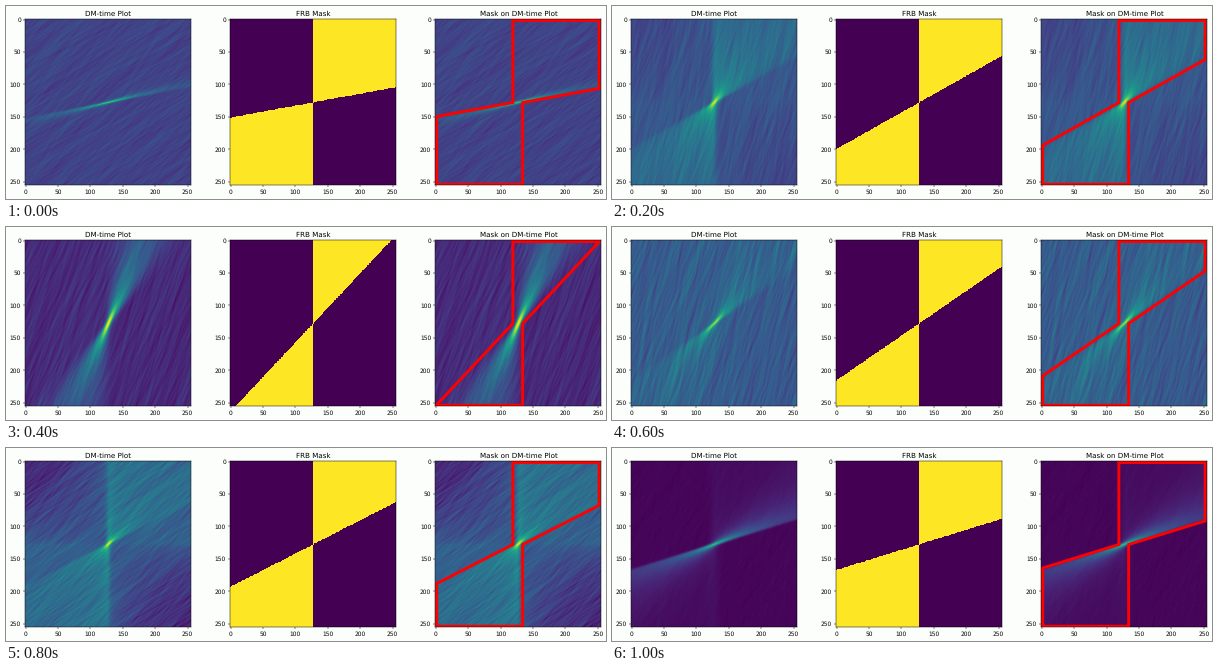
A matplotlib script that plays this animation: 600 px wide and 193 px high, repeating every 1200 ms.

```python
import numpy as np
import matplotlib.pyplot as plt
from matplotlib.animation import FuncAnimation

W, H, DPI = 600, 193, 100
SCALE = 0.426         # shrinks the default point sizes to the small stage
SIZE = 256
MID = SIZE // 2
PAPER = "#fcfefc"

plt.rcParams.update({
    "font.family": "DejaVu Sans",
    "text.hinting": "none",
    "axes.titlesize": 12 * SCALE,
    "axes.titlepad": 6 * SCALE,
    "axes.linewidth": 0.8 * SCALE,
    "xtick.labelsize": 10 * SCALE,
    "ytick.labelsize": 10 * SCALE,
})
for axis in ("xtick", "ytick"):
    plt.rcParams.update({
        f"{axis}.major.size": 3.5 * SCALE,
        f"{axis}.major.pad": 3.5 * SCALE,
        f"{axis}.major.width": 0.8 * SCALE,
    })

# rise: height of the mask edge over half the plot
# mu, sigma: which delays carry the pulse; edge: share at zero delay
# drift: range of noise delays; dark: dimming of the two empty corners
BURSTS = [
    dict(rise=23.5, mu=4.2, sigma=1.0, edge=0.05, width=6.0, gamma=1.4, gain=0.52,
         base=0.2, drift=(0.6, 2.2), noise=0.024, dark=0.0),
    dict(rise=72, mu=0.6, sigma=0.7, edge=0.35, width=2.6, gamma=0.68, gain=0.70,
         base=0.27, drift=(0.05, 0.5), noise=0.024, dark=0.06),
    dict(rise=136.5, mu=0.43, sigma=0.17, edge=0.0, width=2.6, gamma=0.75, gain=0.88,
         base=0.12, drift=(0.2, 0.6), noise=0.025, dark=0.0),
    dict(rise=88, mu=0.9, sigma=0.4, edge=0.0, width=2.6, gamma=1.0, gain=0.62,
         base=0.29, drift=(0.1, 0.5), noise=0.036, dark=0.0),
    dict(rise=65.5, mu=0.8, sigma=1.0, edge=0.6, width=2.6, gamma=0.75, gain=0.62,
         base=0.31, drift=(0.6, 1.9), noise=0.035, dark=0.22),
    dict(rise=39.5, mu=2.6, sigma=1.0, edge=0.05, width=4.0, gamma=0.7, gain=0.68,
         base=0.015, drift=(0.0, 1.0), noise=0.004, dark=0.0),
]

yy, xx = np.mgrid[:SIZE, :SIZE].astype(float)
dx, dy = xx - MID, yy - MID


def pulse_fan(b):
    """Sum the pulse over channels, each sheared by its own delay."""
    delays = np.linspace(0, MID / b["rise"], 120)
    weights = np.exp(-0.5 * ((delays - b["mu"]) / b["sigma"]) ** 2)
    weights /= weights.sum()
    zero_delay = np.exp(-delays / 0.1)
    weights += b["edge"] * 0.25 * zero_delay / zero_delay.sum()
    weights /= weights.sum()
    fan = np.zeros((SIZE, SIZE))
    for delay, weight in zip(delays, weights):
        spread = np.hypot(b["width"], 0.012 * dy * (1 + delay))
        shape = np.exp(-0.5 * ((dx + delay * dy) / spread) ** 2)
        fan += weight * shape * b["width"] / spread
    return fan ** b["gamma"]


def streaks(b, rng, channels=36):
    """Sheared one-dimensional noise, scaled to unit deviation."""
    total = np.zeros((SIZE, SIZE))
    for delay in np.linspace(*b["drift"], channels):
        strip = rng.normal(size=1024)
        strip = np.convolve(strip, [0.25, 0.5, 0.25], "same")
        total += np.interp(dx + delay * dy + 512, np.arange(1024), strip)
    return (total - total.mean()) / total.std()


def dm_time(index):
    b = BURSTS[index]
    rng = np.random.default_rng(40 + index)
    corners = np.clip(dx * dy, 0, None) / MID ** 2
    floor = b["base"] - b["dark"] * np.sqrt(corners)
    return floor + b["noise"] * streaks(b, rng) + b["gain"] * pulse_fan(b)


def burst_mask(rise):
    below = dy > -rise / MID * dx
    return np.where(dx < 0, below, ~below).astype(float)


def outline(rise):
    slope = rise / MID
    left, right, top, bottom = 1.5, 252, 1.5, 254
    inner_l, inner_r, waist = 119, 134, 128
    return [
        (inner_l, top), (inner_l, waist),
        (left, min(waist + slope * (inner_l - left), bottom)),
        (left, bottom), (inner_r, bottom), (inner_r, waist),
        (right, max(waist - slope * (right - inner_r), top)),
        (right, top),
    ]


fig = plt.figure(figsize=(W / DPI, H / DPI), dpi=DPI, facecolor=PAPER)


def add_panel(left, title, smoothing):
    side, top = 166, 13.2
    ax = fig.add_axes([left / W, 1 - (top + side) / H, side / W, side / H])
    ax.set_title(title)
    image = ax.imshow(np.zeros((SIZE, SIZE)), cmap="viridis", vmin=0, vmax=1,
                      aspect="auto", interpolation=smoothing)
    ax.set_xticks(range(0, 251, 50))
    ax.set_yticks(range(0, 251, 50))
    return ax, image


_, plot_image = add_panel(19.2, "DM-time Plot", "antialiased")
_, mask_image = add_panel(224.2, "FRB Mask", "nearest")
ax_overlay, overlay_image = add_panel(429.4, "Mask on DM-time Plot", "antialiased")
ax_overlay.plot([136, 255], [254.5, 254.5], color="#b8b4c4", linewidth=0.7,
                scalex=False, scaley=False)
frame_line = plt.Polygon(outline(BURSTS[0]["rise"]), fill=False, edgecolor="red",
                         linewidth=2.1, joinstyle="miter")
ax_overlay.add_patch(frame_line)

plots = [dm_time(i) for i in range(len(BURSTS))]


def update(i):
    rise = BURSTS[i]["rise"]
    plot_image.set_data(plots[i])
    overlay_image.set_data(plots[i])
    mask_image.set_data(burst_mask(rise))
    frame_line.set_xy(outline(rise))
    return plot_image, mask_image, overlay_image, frame_line


anim = FuncAnimation(fig, update, frames=len(BURSTS), interval=200,
                     repeat=True, repeat_delay=0, blit=False)
plt.show()
```
